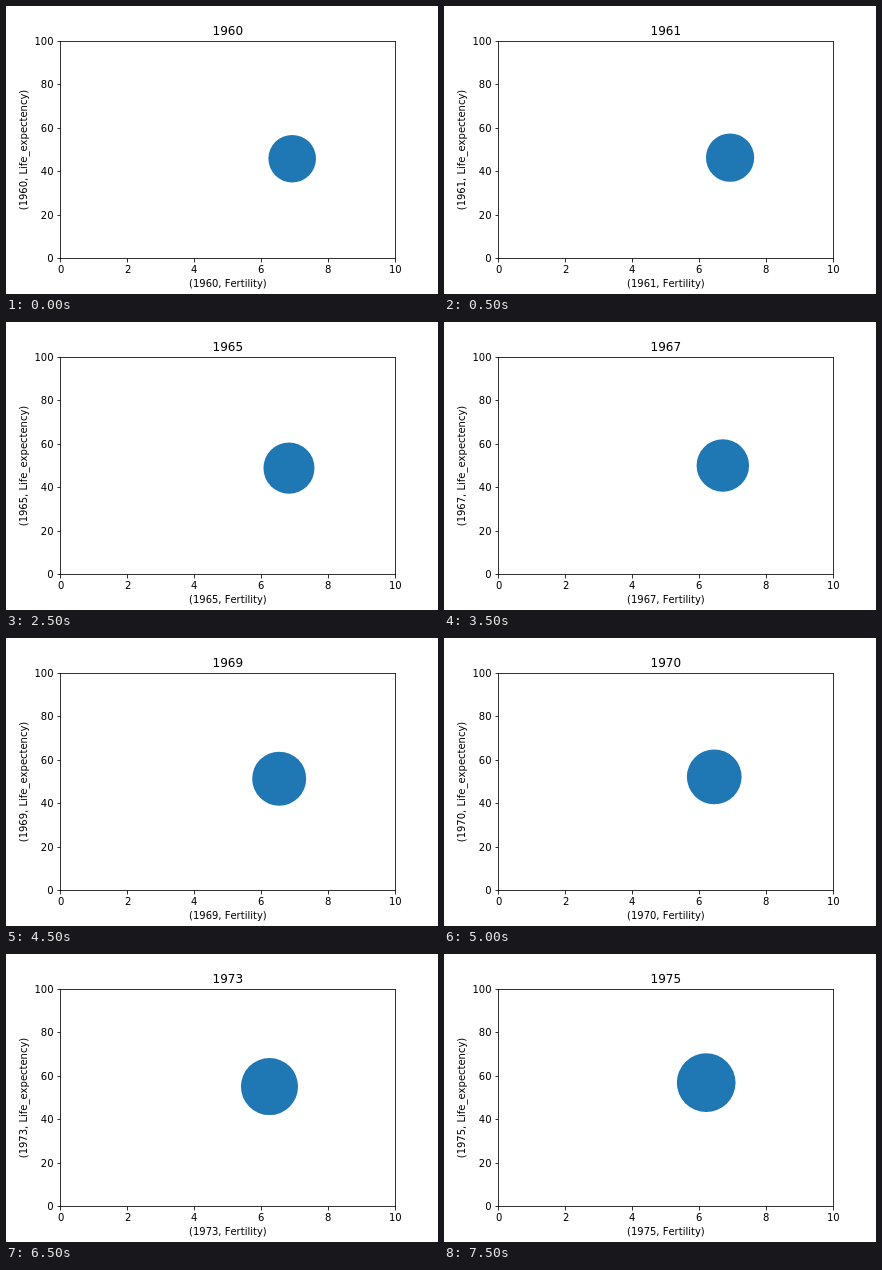
These frames come from a looping animation (432x288 px, 8 s). An HTML page:

```html
<!DOCTYPE html>
<html lang="en">
<head>
<meta charset="utf-8">
<title>Fertility and life expectancy</title>
<style>
  html, body { margin: 0; width: 100%; height: 100%; overflow: hidden; background: #fff; }
  svg { display: block; width: 432px; height: 288px; }
  text { font: 10px "DejaVu Sans", sans-serif; font-kerning: none; fill: #000; }
  .mid { text-anchor: middle; }
  .end { text-anchor: end; }
  #title { font-size: 12px; }
  path { fill: none; stroke: #000; stroke-width: .8; }
</style>
</head>
<body>
<svg viewBox="0 0 432 288">
  <circle id="bubble" fill="#1f77b4"/>
  <path id="across"/>
  <path id="down"/>
  <g id="labels"></g>
  <text id="title" class="mid" x="221.8" y="29"></text>
  <text id="xlabel" x="183" y="281"></text>
  <text id="ylabel" class="mid" transform="translate(21 144) rotate(-90)"></text>
</svg>
<script>
const STEP = 500, YEARS = 16, FIRST_YEAR = 1960;

// Bubble centre every third year, in stage pixels
const KEY_GAP = 3;
const keyX = [286.2, 285.3, 281.2, 273.2, 264.9, 262.2];
const keyY = [152.7, 148.7, 144.8, 140.7, 134.8, 128.7];

const radius = n => 23.8 * Math.exp(0.014 * n);
const snap = v => Math.floor(v + 0.5) + 0.5;
const el = id => document.getElementById(id);

function setAttrs(node, attrs) {
  for (const name in attrs) node.setAttribute(name, attrs[name]);
}

// Smooth curve through evenly spaced keys (Catmull-Rom)
function curve(keys, pos) {
  const last = keys.length - 1;
  const i = Math.min(Math.floor(pos), last - 1), t = pos - i;
  const a = keys[i], b = keys[i + 1];
  const before = keys[Math.max(i - 1, 0)], after = keys[Math.min(i + 2, last)];
  const slopeA = (b - before) / 2, slopeB = (after - a) / 2;
  const ease = t * t * (3 - 2 * t);
  return a + (b - a) * ease
    + slopeA * t * (1 - t) ** 2 - slopeB * t * t * (1 - t);
}

function addLabel(text, x, y, cls) {
  const node = document.createElementNS("http://www.w3.org/2000/svg", "text");
  setAttrs(node, { x, y, class: cls });
  node.textContent = text;
  el("labels").append(node);
}

function buildAxes() {
  let across = "M54.1 35.5H389.9M54.1 252.5H389.9";
  let down = "M54.5 35.1V252.9M389.5 35.1V252.9";
  for (let i = 0; i <= 5; i++) {
    const x = 54 + 66.96 * i, y = 252 - 43.488 * i;
    const digits = String(2 * i).length;
    across += `M54.5 ${snap(y)}h-3`;
    down += `M${snap(x)} 252.5v4`;
    addLabel(2 * i, Math.round(x + 0.75 - 3.18 * digits), 267, "");
    addLabel(20 * i, 47.6, Math.round(y) + 4, "end");
  }
  setAttrs(el("across"), { d: across });
  setAttrs(el("down"), { d: down });
}

let shown = -1;

function show(n) {
  if (n === shown) return;
  shown = n;
  const year = FIRST_YEAR + n, pos = n / KEY_GAP;
  setAttrs(el("bubble"), { cx: curve(keyX, pos), cy: curve(keyY, pos), r: radius(n) });
  el("title").textContent = year;
  el("xlabel").textContent = `(${year}, Fertility)`;
  el("ylabel").textContent = `(${year}, Life_expectency)`;
}

const start = performance.now();

function tick() {
  const t = performance.now() - start;
  show(Math.floor(t / STEP) % YEARS);
  requestAnimationFrame(tick);
}

buildAxes();
tick();
</script>
</body>
</html>
```
